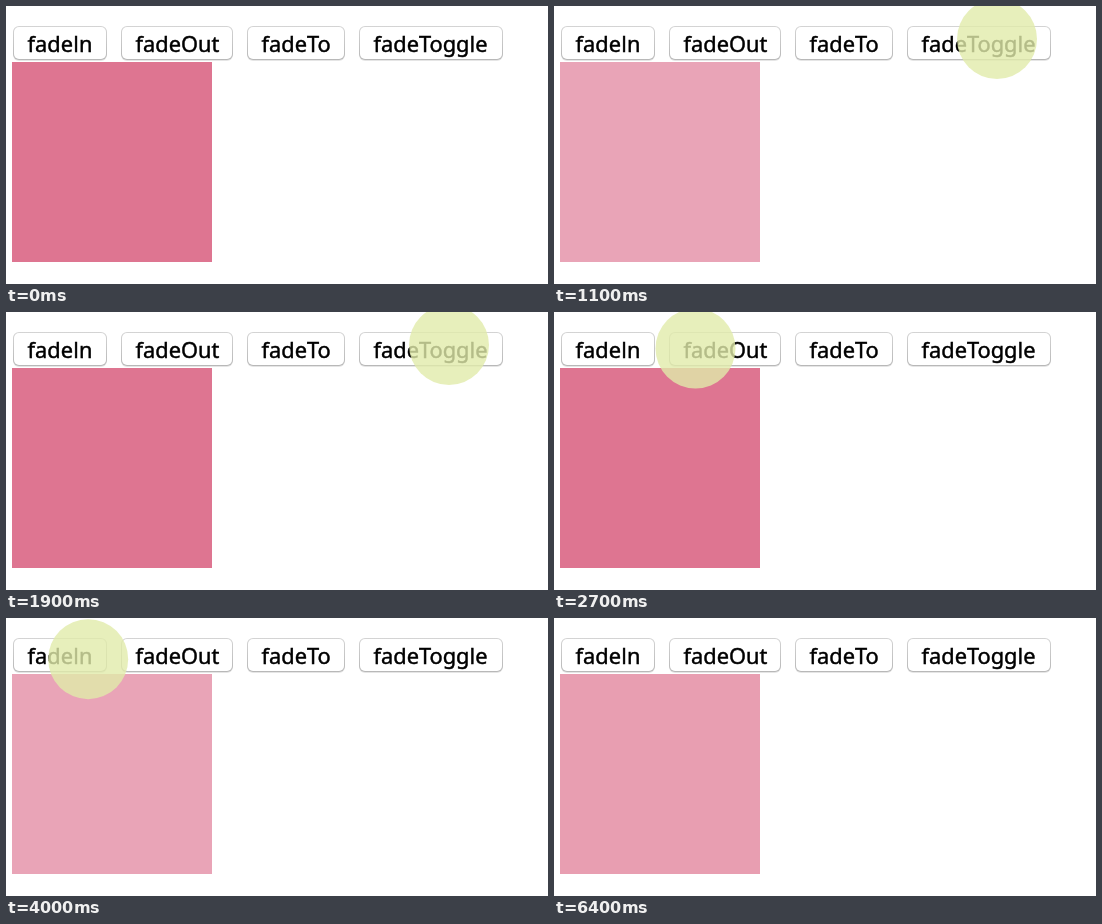
An HTML page with a canvas for the animation above (7100 ms loop, 542x278 px).

```html
<!DOCTYPE html>
<html lang="en">
<head>
<meta charset="utf-8">
<title>Fade buttons</title>
<style>
html, body { margin: 0; width: 100%; height: 100%; overflow: hidden; background: #fff; }
canvas { display: block; width: 542px; height: 278px; }
</style>
</head>
<body>
<canvas id="stage" width="542" height="278"></canvas>
<script>
const ctx = document.getElementById('stage').getContext('2d');
const LOOP = 7100, STEP = 100, GAP = 14, PAD = 14.5;
const SANS = '21.8px "Noto Sans", "Open Sans", sans-serif';
const PLAIN = '21.8px "Open Sans", "Noto Sans", sans-serif';

const buttons = [
  { parts: ['fade', 'I', 'n'], w: 94 },
  { parts: ['fadeOut'], w: 112 },
  { parts: ['fadeTo'], w: 98 },
  { parts: ['fadeToggle'], w: 144 }
];

const clicks = [
  { at: 900, button: 3, alpha: 0, dur: 500 },
  { at: 1600, button: 3, alpha: 1, dur: 300 },
  { at: 2900, button: 1, alpha: 0, dur: 500 },
  { at: 3700, button: 0, alpha: 1, dur: 500 },
  { at: 4500, button: 2, alpha: 0.7, dur: 200 }
];

// The pointer rests between moves; bend bows a move downwards.
const ENTER = 100, LEAVE = 6400;
const moves = [
  { at: ENTER, end: 600, x: 443, y: 33 },
  { at: 2000, end: 2700, x: 141.5, y: 36.5, bend: 50 },
  { at: 3100, end: 3500, x: 46, y: 41.5 },
  { at: 3900, end: 4300, x: 293, y: 39 },
  { at: 4500, end: 4700, x: 292, y: 52 },
  { at: 5900, end: LEAVE, x: 320, y: -40 }
];

const mix = (a, b, k) => a + (b - a) * k;
const swing = p => 0.5 - Math.cos(p * Math.PI) / 2;
const progress = (t, at, dur) => swing(Math.min(1, Math.max(0, (t - at) / dur)));

const boxAlpha = t =>
  clicks.reduce((a, c) => mix(a, c.alpha, progress(t, c.at, c.dur)), 1);

function pointer(t) {
  let x = 517, y = 64;
  for (const m of moves) {
    const k = progress(t, m.at, m.end - m.at);
    x = mix(x, m.x, k);
    y = mix(y, m.y, k) + (m.bend || 0) * Math.sin(k * Math.PI);
  }
  return [x, y];
}

function roundRect(x, y, w, h, r, fill) {
  ctx.beginPath();
  ctx.roundRect(x, y, w, h, r);
  ctx.fillStyle = fill;
  ctx.fill();
}

function label(parts, x, color) {
  ctx.fillStyle = ctx.strokeStyle = color;
  ctx.lineWidth = 0.45;
  for (const s of parts) {
    ctx.font = s === 'I' ? PLAIN : SANS;
    ctx.fillText(s, x, 46);
    ctx.strokeText(s, x, 46);
    x += ctx.measureText(s).width;
  }
}

function shade(top, bottom) {
  const g = ctx.createLinearGradient(0, 20, 0, 54);
  g.addColorStop(0, top);
  g.addColorStop(1, bottom);
  return g;
}

function drawButton(b, x, down) {
  roundRect(x, 21, b.w, 34, 6, 'rgba(0, 0, 0, 0.1)');
  roundRect(x, 20, b.w, 34, 6, down ? shade('#4ca0f8', '#0a50c8') : shade('#d4d4d4', '#b8b8b8'));
  roundRect(x + 1, 21, b.w - 2, 32, 5, down ? shade('#6cb3fa', '#087eff') : '#fff');
  label(b.parts, x + PAD, down ? '#fff' : '#000');
}

function draw(t) {
  ctx.fillStyle = '#fff';
  ctx.fillRect(0, 0, 542, 278);

  ctx.globalAlpha = boxAlpha(t);
  ctx.fillStyle = '#de7591';
  ctx.fillRect(6, 56, 200, 200);
  ctx.globalAlpha = 1;

  let x = 7;
  buttons.forEach((b, i) => {
    drawButton(b, x, clicks.some(c => c.button === i && c.at === t));
    x += b.w + GAP;
  });

  if (t >= ENTER && t < LEAVE) {
    ctx.fillStyle = 'rgba(226, 236, 171, 0.8)';
    ctx.beginPath();
    ctx.arc(...pointer(t), 40, 0, Math.PI * 2);
    ctx.fill();
  }
}

const begin = performance.now();
function tick() {
  const t = (performance.now() - begin) % LOOP;
  draw(Math.floor(t / STEP) * STEP);
  requestAnimationFrame(tick);
}
tick();
</script>
</body>
</html>
```
